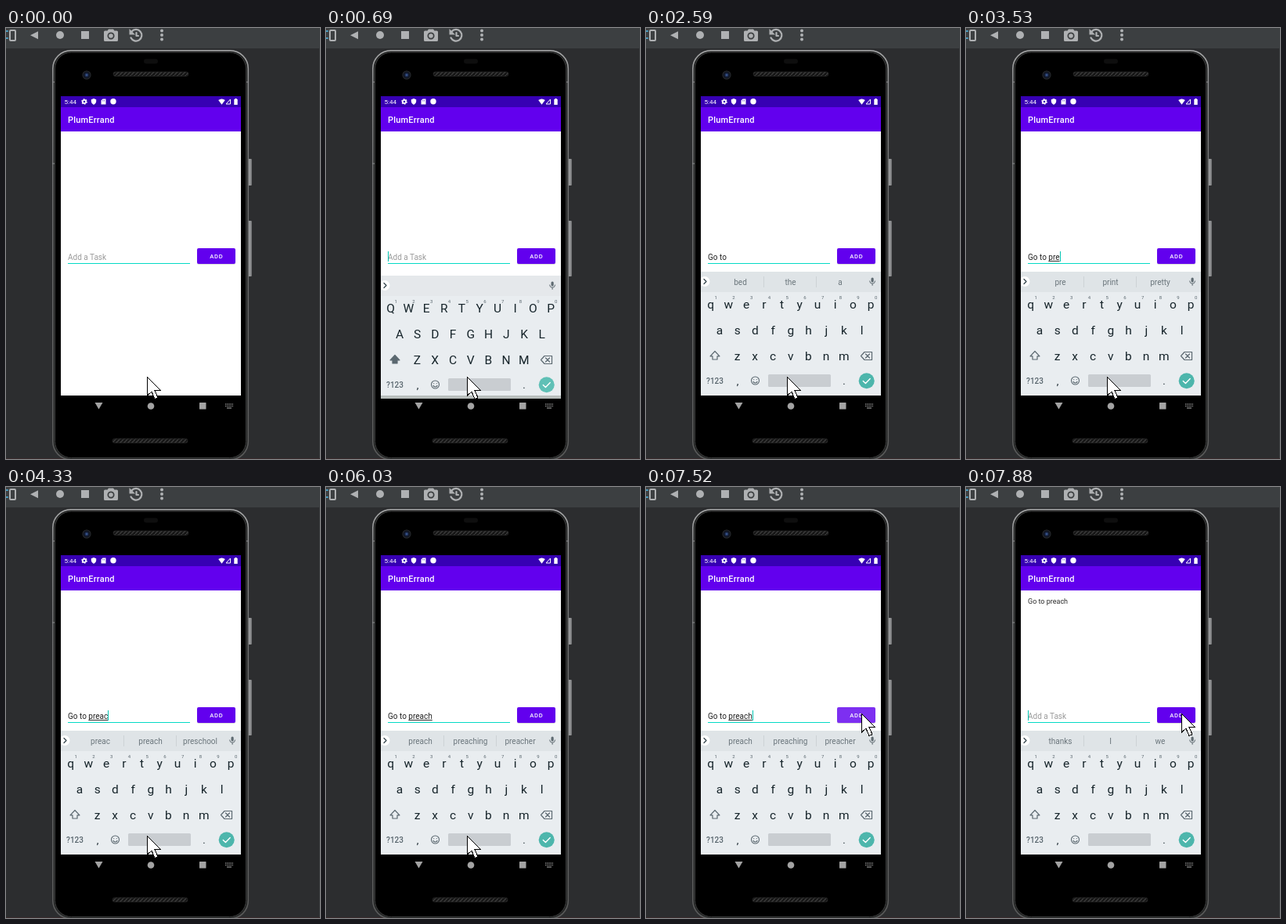
An HTML page that plays this animation: 401 by 550 pixels, repeating every 8000 ms.

```html
<!DOCTYPE html>
<html lang="en">
<head>
<meta charset="utf-8">
<title>To-do app demo</title>
<style>
html, body { margin: 0; width: 100%; height: 100%; overflow: hidden; background: #2c2d2f; }
svg { display: block; width: 401px; height: 550px; }
text { font-family: Roboto, "Open Sans", sans-serif; white-space: pre; }
.mid { text-anchor: middle; }
.line { fill: none; stroke-linecap: round; stroke-linejoin: round; }
</style>
</head>
<body>
<svg id="stage" viewBox="0 0 401 550" xmlns="http://www.w3.org/2000/svg">
  <defs>
    <clipPath id="screen"><rect x="70" y="87" width="230" height="386"/></clipPath>
    <pattern id="mesh" width="5" height="5" patternUnits="userSpaceOnUse">
      <rect width="5" height="5" fill="#151515"/>
      <path d="M0 5 L5 0" stroke="#3d3d3d" stroke-width="1.3"/>
    </pattern>
    <linearGradient id="metal">
      <stop offset="0" stop-color="#4a4b4d"/><stop offset=".5" stop-color="#a2a3a5"/><stop offset="1" stop-color="#6c6d6f"/>
    </linearGradient>
    <linearGradient id="rim" x2="0" y2="1">
      <stop offset="0" stop-color="#a9aaab"/><stop offset=".08" stop-color="#88898a"/><stop offset=".3" stop-color="#6c6d6e"/><stop offset="1" stop-color="#585959"/>
    </linearGradient>
    <radialGradient id="lens">
      <stop offset="0" stop-color="#4466a8"/><stop offset=".45" stop-color="#131d36"/><stop offset=".75" stop-color="#10131a"/><stop offset="1" stop-color="#34363a"/>
    </radialGradient>
  </defs>

  <!-- emulator toolbar -->
  <rect width="401" height="550" fill="#2c2d2f"/>
  <rect width="401" height="26" fill="#3c3f41"/>
  <rect x="400" width="1" height="550" fill="#3c3f41"/>
  <rect y="549" width="401" height="1" fill="#3a2a2c"/>
  <g fill="#afb1b3">
    <rect x="5" y="3" width="7" height="13" rx="1" fill="none" stroke="#afb1b3" stroke-width="2"/>
    <path class="line" d="M0 4 H2 M0 13 H2" stroke="#4a9fc4" stroke-width="2"/>
    <path d="M31 9.300 L41 4.300 V14.300 Z"/>
    <circle cx="69" cy="9" r="5"/>
    <rect x="96" y="4" width="10" height="10"/>
    <path fill-rule="evenodd" d="M125 5 Q125 3.500 126.500 3.500 H129.500 L131 1.500 H137 L138.500 3.500 H141.500 Q143 3.500 143 5 V15.500 Q143 17 141.500 17 H126.500 Q125 17 125 15.500 Z M134 5.500 A4.500 4.500 0 1 0 134.010 5.500 Z"/>
    <circle cx="134" cy="10" r="2.800"/>
    <path class="line" d="M160.500 4.500 A7.300 7.300 0 1 1 159.500 12.500 M166.500 6 V10 H169" stroke="#afb1b3" stroke-width="2.200"/>
    <path d="M157.500 1 V8.500 H165 Z"/>
    <circle cx="199" cy="3.500" r="2"/><circle cx="199" cy="9" r="2"/><circle cx="199" cy="14.500" r="2"/>
  </g>

  <!-- phone body -->
  <rect x="308" y="167" width="6" height="34" rx="1" fill="url(#metal)"/>
  <rect x="308" y="246" width="6" height="71" rx="1" fill="url(#metal)"/>
  <rect x="59.800" y="28.800" width="249.500" height="522" rx="23" fill="#232424" stroke="url(#rim)" stroke-width="1.600"/>
  <rect x="62.500" y="31" width="244" height="517.500" rx="21" fill="#000" stroke="#3c3d3d"/>
  <path d="M59 69 H62 M59 173 H62 M307 69 H310" stroke="#8a8b8d"/>
  <circle cx="103" cy="60" r="5.500" fill="url(#lens)"/>
  <rect x="176" y="39.500" width="18" height="6" rx="3" fill="#0e0e0e"/>
  <g fill="url(#mesh)" stroke="#2c2c2c" stroke-width=".6">
    <rect x="137" y="56" width="96" height="5.500" rx="2.700"/>
    <rect x="136" y="524" width="96" height="5.500" rx="2.700"/>
  </g>

  <!-- app -->
  <rect x="70" y="87" width="230" height="382" fill="#fff"/>
  <rect x="70" y="87" width="230" height="14" fill="#3700b3"/>
  <rect x="70" y="101" width="230" height="31" fill="#6200ee"/>
  <g fill="#fff">
    <text x="74.500" y="97" font-size="8">5:44</text>
    <circle cx="100" cy="94" r="2.100" fill="none" stroke="#fff" stroke-width="1.700"/>
    <circle cx="100" cy="94" r="3.200" fill="none" stroke="#fff" stroke-width="1.200" stroke-dasharray="1.700 1.650"/>
    <path d="M112 90 L115.200 91.300 V94 Q115 96.800 112 98 Q109 96.800 108.800 94 V91.300 Z"/>
    <path fill-rule="evenodd" d="M123.500 90.500 H127.500 V97.500 H121.500 V92.500 Z M123.500 92 V93.500 H124.100 V92 Z M125.300 92 V93.500 H125.900 V92 Z"/>
    <circle cx="137" cy="93.800" r="3.700"/>
    <path d="M275.500 97.800 L271.200 92 Q275.500 88.800 279.800 92 Z"/>
    <path d="M286.500 91 V97 H281 Z" fill="none" stroke="#fff"/>
    <path d="M292.300 90 H294.700 V91 H295.700 V98 H291.300 V91 H292.300 Z"/>
    <text x="79" y="120.500" font-size="11" font-weight="500" letter-spacing=".2">PlumErrand</text>
  </g>
  <text id="item" x="79" y="149" font-size="9" fill="#2b2b2b">Go to preach</text>
  <text id="field" x="79" y="295.500" font-size="10"></text>
  <rect id="compose" y="297" height="1" fill="#333"/>
  <rect x="79" y="300" width="156" height="1" fill="#03dac5"/>
  <rect id="caret" y="285" width="1" height="13" fill="#03c4b2"/>
  <rect x="244" y="282" width="49" height="20" rx="2" fill="#000" opacity=".14"/>
  <rect id="button" x="244" y="281" width="49" height="20" rx="2"/>
  <text x="268.800" y="293.800" font-size="7.600" font-weight="500" letter-spacing=".67" class="mid" fill="#fff">ADD</text>

  <!-- navigation bar -->
  <g fill="#a3a3a3">
    <path d="M113.500 478 H123.500 L118.500 486.500 Z"/>
    <circle cx="185" cy="482.500" r="4.300"/>
    <rect x="247" y="478" width="8.500" height="8.500" rx=".5"/>
    <path d="M280 480 H290 M280 482.500 H290" stroke="#858585" stroke-width="1.400" stroke-dasharray="1.300 .9"/>
    <path d="M282 485 H288" stroke="#858585" stroke-width="1.300"/>
  </g>

  <g id="keyboard" clip-path="url(#screen)">
    <g id="slide">
      <rect x="70" y="311" width="230" height="158" fill="#e9edf0"/>
      <rect id="strip" x="70" y="311" width="230" height="26"/>
      <circle cx="75" cy="323.500" r="6.500" fill="#fff"/>
      <path class="line" d="M74 320.500 L77 323.500 L74 326.500" stroke="#37474f" stroke-width="1.300"/>
      <g id="words" font-size="10" fill="#6a757b">
        <path d="M150.500 317 V331 M217.500 317 V331" stroke="#cdd3d6"/>
      </g>
      <rect x="287.500" y="318.500" width="3.200" height="6" rx="1.600" fill="#5f6b72"/>
      <path class="line" d="M285.600 323 Q285.900 326.300 289.100 326.300 Q292.300 326.300 292.600 323 M289.100 326.300 V328.500" stroke="#5f6b72"/>
      <g id="keys" fill="#16242a"></g>
      <path id="shift" class="line" d="M88 412.500 L94 418.800 H91 V423 H85 V418.800 H82 Z" stroke="#5b6870" stroke-width="1.200"/>
      <path class="line" d="M279 413.500 H288.500 V423.500 H279 L274.500 418.500 Z M280.500 416 L285.500 421 M285.500 416 L280.500 421" stroke="#5b6870" stroke-width="1.200"/>
      <text x="88" y="454" font-size="10" font-weight="500" class="mid" fill="#58656d">?123</text>
      <text x="117" y="455" font-size="13" class="mid" fill="#16242a">,</text>
      <text x="253" y="455" font-size="13" class="mid" fill="#16242a">.</text>
      <circle cx="139.500" cy="450" r="5" fill="none" stroke="#5b6870" stroke-width="1.100"/>
      <path class="line" d="M137 451.500 Q139.500 454.500 142 451.500 M137.700 448.500 V448.600 M141.300 448.500 V448.600" stroke="#5b6870" stroke-width="1.200"/>
      <rect x="156" y="442" width="80" height="16" rx="1.500" fill="#c9cdd1"/>
      <circle id="enter" cx="281.700" cy="450.300" r="10"/>
      <path class="line" d="M277.300 450.600 L280.400 453.600 L286.200 447.500" stroke="#fff" stroke-width="1.400"/>
    </g>
    <rect id="edge" x="70" y="469" width="230" height="4" fill="#b9bfbd"/>
  </g>

  <path id="pointer" d="M.5 .5 V24 L6 19 L10 28.500 L14 26.800 L10 17.500 H17.500 Z" fill="#fff" stroke="#000" shape-rendering="crispEdges"/>
</svg>
<script>
const LOOP = 8000;
const $ = id => document.getElementById(id);
const set = (el, attrs) => { for (const k in attrs) el.setAttribute(k, attrs[k]); };
const show = (el, on) => set(el, { visibility: on ? "visible" : "hidden" });

function addText(parent, text, attrs) {
  const el = document.createElementNS("http://www.w3.org/2000/svg", "text");
  el.textContent = text;
  set(el, attrs);
  return parent.appendChild(el);
}

// letter keys: letters, first centre, baseline
const PITCH = 22.72;
const keys = [["qwertyuiop", 82.6, 358], ["asdfghjkl", 94, 391], ["zxcvbnm", 116.5, 424]]
  .flatMap(([row, x, y]) => [...row].map((c, i) =>
    addText($("keys"), c, { x: x + i * PITCH, y, "font-size": 15.5, class: "mid" })));
[..."1234567890"].forEach((d, i) =>
  addText($("keys"), d, { x: 89.3 + i * PITCH, y: 346, "font-size": 6, class: "mid", fill: "#59666d" }));
const words = [120.5, 184.5, 248].map(x => addText($("words"), "", { x, y: 327.5, class: "mid" }));

const start = {
  done: "", typing: "", caret: 0, kb: 0, drop: 0, caps: 1, sug: "",
  item: 0, press: 0, at: [180, 445]
};

// each step changes part of the state and holds until the next
const steps = [
  [260, { caret: 1 }],
  [690, { kb: 1, drop: 5 }],
  [840, { drop: 0 }],
  [960, { typing: "G", caps: 0, sug: "G Good Go" }],
  [1520, { typing: "Go", sug: "Go Good To" }],
  [1650, { done: "Go ", typing: "", sug: "to back in" }],
  [1790, { typing: "t", sug: "the to today" }],
  [1910, { typing: "to", sug: "to too top" }],
  [2040, { done: "Go to ", typing: "" }],
  [2190, { sug: "bed the a" }],
  [2590, { caret: 0 }],
  [3100, { typing: "p", caret: 1 }],
  [3240, { sug: "pay place p" }],
  [3380, { typing: "pr", sug: "pay print pr" }],
  [3530, { typing: "pre", sug: "pre print pretty" }],
  [3650, { sug: "pre press pretty" }],
  [3930, { typing: "prea", sug: "prea preach pretty" }],
  [4210, { typing: "preac" }],
  [4330, { sug: "preac preach preschool" }],
  [4590, { typing: "preach", sug: "preach preaching preacher" }],
  [5040, { caret: 0 }],
  [5630, { caret: 1 }],
  [6030, { caret: 0 }],
  [6150, { at: [194, 424] }],
  [6270, { at: [230, 365] }],
  [6390, { at: [263, 308] }],
  [6510, { at: [277, 287], caret: 1 }],
  [6660, { at: [277, 271] }],
  [6940, { at: [275, 287] }],
  [7090, { at: [275, 289], caret: 0 }],
  [7520, { press: 1, caret: 1 }],
  [7640, { item: 1, done: "", typing: "" }],
  [7760, { sug: "thanks I we" }],
  [7880, { press: 0 }]
];

function draw(s) {
  const text = s.done + s.typing;
  const field = $("field");
  field.textContent = text || "Add a Task";
  set(field, { fill: text ? "#222" : "#9a9a9a" });
  const width = n => n ? field.getSubStringLength(0, n) : 0;
  const from = 79 + width(s.done.length), end = 79 + width(text.length);
  set($("compose"), { x: from, width: end - from });
  set($("caret"), { x: Math.round(end) });
  show($("caret"), s.caret);
  show($("item"), s.item);
  set($("button"), { fill: s.press ? "#7d2ff1" : "#6200ee" });

  show($("keyboard"), s.kb);
  show($("edge"), s.kb && s.drop);
  set($("slide"), { transform: `translate(0 ${s.drop})` });
  set($("strip"), { fill: s.drop ? "#e5e8eb" : "#dfe4e7" });
  set($("enter"), { fill: s.drop ? "#5fc0b6" : "#4db6ac" });
  set($("shift"), { style: `fill:${s.caps ? "#5b6870" : "none"}` });
  keys.forEach(k => k.textContent = s.caps ? k.textContent.toUpperCase() : k.textContent.toLowerCase());
  show($("words"), s.kb && s.sug);
  s.sug.split(" ").forEach((w, i) => words[i].textContent = w);
  set($("pointer"), { transform: `translate(${s.at})` });
}

let last = -1;
const begin = performance.now();
function tick() {
  const t = Math.max(0, performance.now() - begin) % LOOP;
  const past = steps.filter(([at]) => at <= t);
  if (past.length !== last) {
    last = past.length;
    draw(Object.assign({}, start, ...past.map(p => p[1])));
  }
  requestAnimationFrame(tick);
}
tick();
</script>
</body>
</html>
```
